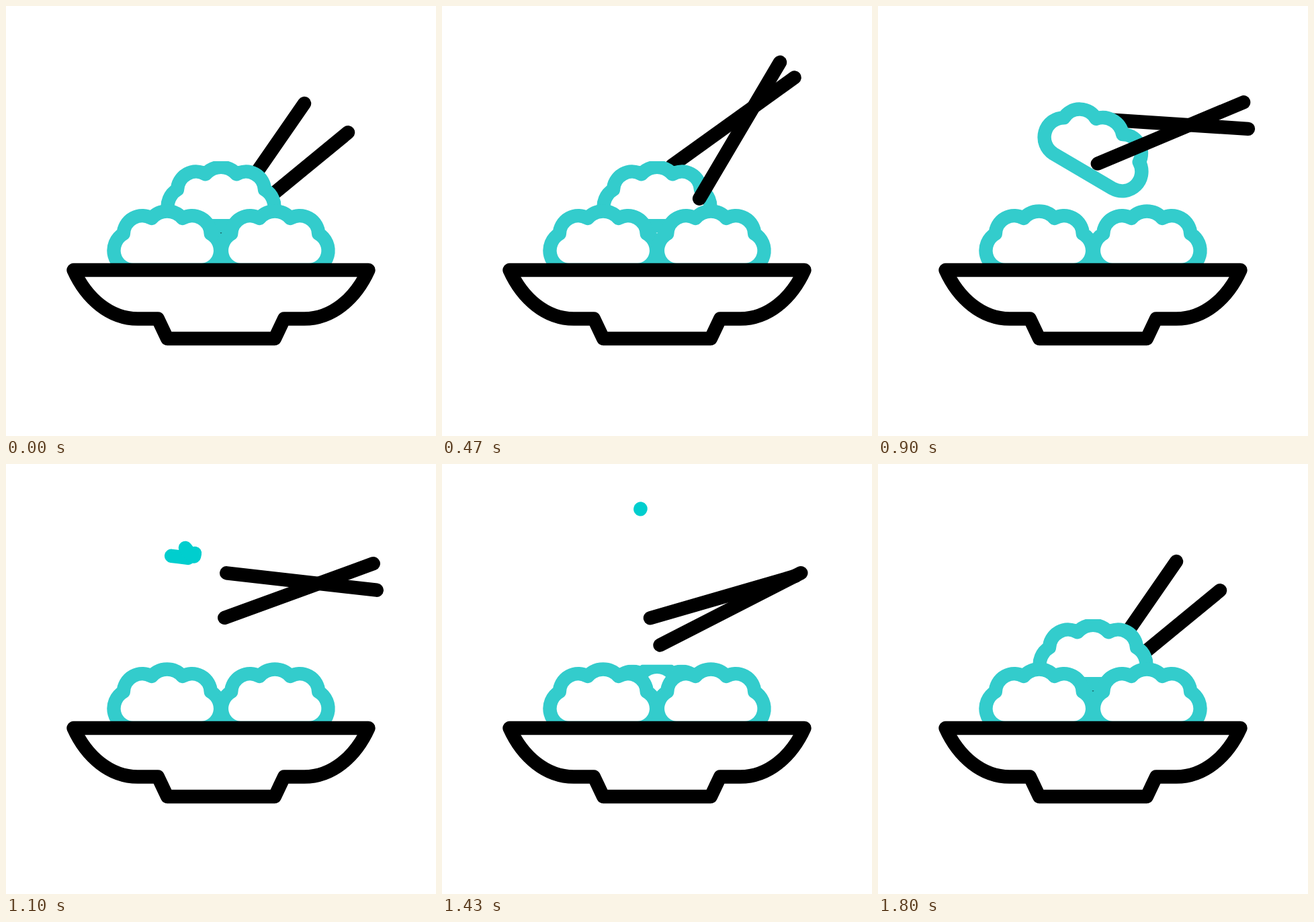
An HTML page for the animation above (2000 ms loop, 640 by 640 pixels).

```html
<!DOCTYPE html>
<html lang="en">
<head>
<meta charset="utf-8">
<title>Rice bowl</title>
<style>
  html, body { margin: 0; width: 100%; height: 100%; overflow: hidden; background: #fff; }
  svg { display: block; width: 100vw; height: 100vh; }
  .line { fill: none; stroke: #000; stroke-width: 20.4; stroke-linecap: round; stroke-linejoin: round; }
  .solid { fill: #fff; }
  .rice { stroke: #3cc; }
  .ray { stroke: #00cece; }
</style>
</head>
<body>
<svg viewBox="0 0 640 640">
  <defs>
    <path id="ball" class="line solid rice" d="M-51 29A29 29 0 0 1-65-25A28 28 0 0 1-23-48A30.4 30.4 0 0 1 23-48A28 28 0 0 1 65-25A29 29 0 0 1 51 29Z"/>
    <clipPath id="cut"><rect id="cutBox" x="-200" width="400" height="500"/></clipPath>
  </defs>
  <path id="shortStick" class="line"/>
  <path id="longBack" class="line"/>
  <g id="topBall" clip-path="url(#cut)"><use href="#ball"/></g>
  <use href="#ball" x="239.800" y="364"/>
  <use href="#ball" x="400.200" y="364"/>
  <path class="line solid" d="M100.500 393H539.500C520 436 485 465.500 444 465.500H414L400 495H240L226 465.500H196C155 465.500 120 436 100.500 393Z"/>
  <path id="longFront" class="line"/>
  <g id="rays"></g>
</svg>
<script>
const LOOP = 2000, FPS = 30, LAST = 54;
const REACHED = 9, LIFT = 16.1, GONE = 30;
const $ = id => document.getElementById(id);
const mix = (a, b, p) => a.map((v, i) => v + (b[i] - v) * p);
const ease = (f, from, to) => {
  const x = Math.min(1, Math.max(0, (f - from) / (to - from)));
  return x * x * (3 - 2 * x);
};

// Stick poses: centre x, centre y, angle in degrees
const longStick = {
  length: 235.7,
  rest: [418, 263, -39.4], reach: [486, 156, -52.9],
  grab: [428, 195.5, -61.7], held: [436, 188.5, -20]
};
const shortStick = {
  length: 225,
  rest: [380, 237.5, -55.3], reach: [471, 140, -37.2],
  grab: [420, 183.5, -35.2], held: [440, 175, 6.5]
};

function stickPath({ length, rest, reach, grab, held }, f) {
  let pose = mix(rest, reach, ease(f, 0, REACHED));
  pose = mix(pose, grab, ease(f, REACHED, 16.5));
  pose = mix(pose, held, ease(f, 19, 28.5));
  const [x, y, deg] = mix(pose, rest, ease(f, 35.7, 53.5));
  const a = deg * Math.PI / 180;
  const dx = Math.cos(a) * length / 2, dy = Math.sin(a) * length / 2;
  return `M${x - dx} ${y - dy}L${x + dx} ${y + dy}`;
}

const rays = [
  { from: [271, 140], to: [204.5, 131.5] },
  { from: [275.6, 136], to: [232, 80] },
  { from: [280, 137.5], to: [295.5, 66.5] }
].map((ray, i) => {
  const el = document.createElementNS("http://www.w3.org/2000/svg", "path");
  el.setAttribute("class", "line ray");
  $("rays").append(el);
  return { ...ray, el, start: 29.8 + i };
});

function drawRay({ start, from, to, el }, f) {
  const head = ease(f, start, start + 7.7), tail = ease(f, start + 4, start + 11.7);
  el.setAttribute("d", head > tail ? `M${mix(from, to, tail)}L${mix(from, to, head)}` : "");
}

// The top ball is carried off, then a new one rises from behind the others
function drawTopBall(f) {
  const lifted = f > LIFT && f < GONE;
  const up = ease(f, LIFT, GONE);
  const sunk = 142 * (1 - ease(f, GONE, LAST));
  const shift = lifted ? -88 * up : f < GONE ? 0 : sunk;
  $("topBall").setAttribute("transform", `translate(320 ${298.3 + shift}) rotate(${lifted ? 34.6 * up : 0})`);
  $("cutBox").setAttribute("y", lifted ? -200 : -67.4 + 0.09 * shift);
}

function draw(time) {
  const f = Math.min(LAST, Math.floor((time % LOOP) * FPS / 1000 + 0.15));
  const inFront = f >= REACHED && f < 43;
  const longPath = stickPath(longStick, f);
  $("shortStick").setAttribute("d", stickPath(shortStick, f));
  $("longBack").setAttribute("d", inFront ? "" : longPath);
  $("longFront").setAttribute("d", inFront ? longPath : "");
  drawTopBall(f);
  rays.forEach(ray => drawRay(ray, f));
}

let begin;
function tick(now) {
  begin ??= now;
  draw(now - begin);
  requestAnimationFrame(tick);
}
draw(0);
requestAnimationFrame(tick);
</script>
</body>
</html>
```
